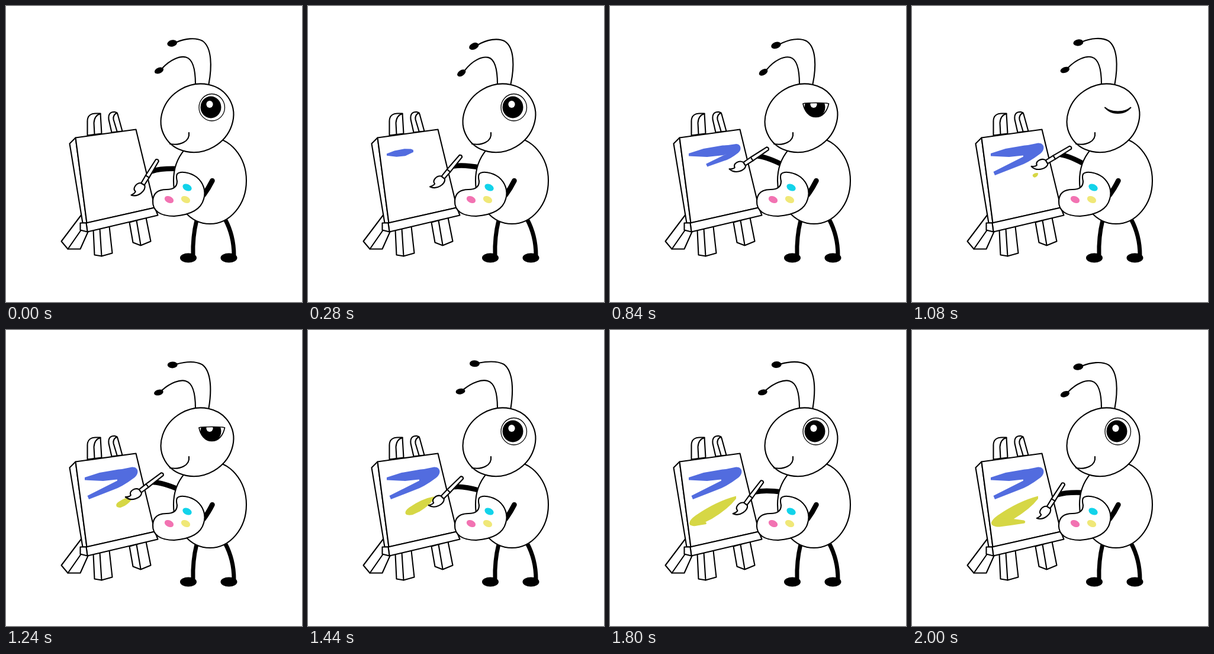
These frames come from a looping animation (500 by 500 pixels, 2040 ms). An HTML page:

```html
<!DOCTYPE html>
<html lang="en">
<head>
<meta charset="utf-8">
<title>Painting ant</title>
<style>
  html, body { margin: 0; width: 100%; height: 100%; overflow: hidden; background: #fff; }
  svg { display: block; width: 100%; height: 100%; }
  .line { fill: none; }
  .limb { fill: none; stroke-width: 8.5; }
  .leg { fill: none; stroke-width: 7; }
  .solid { fill: #000; stroke: none; }
  .blob { stroke: none; }
  .blue { fill: #526cdf; stroke: none; }
  .yellow { fill: #d6d745; stroke: none; }
</style>
</head>
<body>
<svg viewBox="0 0 500 500" fill="#fff" stroke="#000" stroke-width="2.1" stroke-linejoin="round" stroke-linecap="round">
  <defs><clipPath id="lidClip"><path id="lidShape"/></clipPath></defs>

  <g transform="translate(.5 .5)">
    <path d="M137 218V194C137 184 144 181 151 181H159L161 215Z"/>
    <path class="line" d="M149 216L148 197Q149 184 159 181.5"/>
    <path d="M178 213L173 191C172 182 176 178 183 178.5Q187 179 188 182L196 211Z"/>
    <path class="line" d="M187 211L181 191Q180 183 187 180"/>
    <path d="M127 352L93 397L104 410H125L138 381Z"/>
    <path class="line" d="M127 377L104 410"/>
    <path d="M147 378L149 420L161 422L179 417L174 372Z"/>
    <path class="line" d="M158 376L161 422"/>
    <path d="M208 365L214 399L227 404L244 397L236 357Z"/>
    <path class="line" d="M220 362L227 403"/>
    <path d="M107 232L117 222L136 366H129Z"/>
    <path d="M117 222L219 208L251 340L136 366Z"/>
    <path d="M135 366L251 340L256 353L137 381Z"/>
    <path d="M125 366H135L137 381L125 378Z"/>
  </g>

  <path id="blueBar" class="blue" d="M133 249L158 241L190 235.5L211 235L218 237V242L192 252L164 255L133 253.5Z"/>
  <path id="blueTail" class="blue" d="M186 237L213 231.5C224 231 226 243 216 250Q196 265 181 270L140 286L137.500 280L188 254.500Z"/>
  <path id="yellowLeaf" class="yellow" d="M213 280.5Q180 289 145 313Q131 323 135 329Q138 332 152 329L172 319Q200 302 213 285Z"/>
  <path id="yellowTail" class="yellow" d="M134 324Q134 333 148 332.500L170 329.500L190 326.500Q193 323 189 321.500L171 319L150 318Z"/>

  <path id="arm" class="limb" d="M247 279Q261 274 292 275"/>
  <path class="leg" d="M322 362Q315 390 316 421M370 360Q385 388 385 421"/>
  <ellipse class="solid" cx="308" cy="425.5" rx="14" ry="8"/>
  <ellipse class="solid" cx="376.5" cy="425.5" rx="14" ry="8"/>
  <ellipse cx="344.5" cy="295" rx="61.5" ry="73"/>
  <path class="limb" d="M334 319Q342 308 348.5 295"/>

  <path d="M289 284C294 278 311 281 322 289C334 299 338 313 334 326C329 345 310 353 284 355C262 355 247 347 248 329C249 312 262 310 271 310C284 310 289 305 289 296Q287 288 289 284Z"/>
  <ellipse class="blob" fill="#12d3ea" rx="8" ry="5.5" transform="translate(306 306.5) rotate(25)"/>
  <ellipse class="blob" fill="#f273b2" rx="8" ry="5.5" transform="translate(275.5 327) rotate(25)"/>
  <ellipse class="blob" fill="#f0e878" rx="8" ry="5.5" transform="translate(303.5 327) rotate(25)"/>

  <path id="feelers" class="line"/>
  <ellipse id="knobHigh" class="solid" rx="8.5" ry="5.5"/>
  <ellipse id="knobLow" class="solid" rx="8" ry="4.8"/>

  <ellipse rx="63" ry="56" transform="translate(323 189.3) rotate(-30)"/>
  <path class="line" d="M277 233C294 236 311 229 309 214"/>
  <g clip-path="url(#lidClip)">
    <ellipse class="solid" cx="346" cy="171" rx="17.5" ry="18.5"/>
    <ellipse class="blob" cx="344" cy="166" rx="5.6" ry="6"/>
  </g>
  <path id="lid" class="line"/>

  <g id="brush">
    <g transform="translate(231.5 300) rotate(-58.6)">
      <path d="M-1 -3.5C-5 -11 -17 -11 -18 -4Q-21 -3 -27 -7C-24 6 -7 10 -1 4Z"/>
      <path d="M-1 -3.2L14 -3.5L46 -2.8Q49 0 46 2.8L14 3.5L-1 3.2Z"/>
      <path class="line" d="M14 -3.5V3.5"/>
    </g>
  </g>
</svg>
<script>
const LOOP = 2040, STEP = 40;
const armKeys = [[0, 0], [840, 25], [1080, 27.4], [1440, 13.5], [LOOP, 0]];

const $ = id => document.getElementById(id);
const set = (id, name, value) => $(id).setAttribute(name, value);
const ramp = (t, from, to) => Math.min(1, Math.max(0, (t - from) / (to - from)));
const armAngle = t => armKeys.slice(1).reduce((angle, [time, next], i) =>
  angle + (next - armKeys[i][1]) * ramp(t, armKeys[i][0], time), 0);

// Stretches a paint stroke out of its starting point; width runs ahead of length.
function grow(id, x, y, angle, p) {
  set(id, 'transform', `translate(${x} ${y}) rotate(${angle}) ` +
    `scale(${p} ${Math.sqrt(p)}) rotate(${-angle}) translate(${-x} ${-y})`);
  set(id, 'visibility', p > 0 ? 'visible' : 'hidden');
}

function drawPaint(t) {
  grow('blueBar', 133, 251, -8, ramp(t, 0, 530));
  grow('blueTail', 216, 240, 150, ramp(t, 540, 980));
  grow('yellowLeaf', 213, 283, 149, ramp(t, 1000, 1720));
  grow('yellowTail', 138, 328, -5, ramp(t, 1660, 1960));
}

function drawFeelers(t) {
  const s = Math.sin(t / LOOP * 2 * Math.PI);
  set('feelers', 'd',
    `M342.5 132C${348 + s} 103 ${348 + s} 70 ${332 + s} ${59 + s}` +
    `C${320 + s} ${52.5 + s} 302 ${55 + 2 * s} ${287 - s} ${61.5 + 6 * s}` +
    `M320 132C320 110 317 90 ${304 + s / 2} ${86.5 + s / 2}` +
    `C294 ${84 + s} 278 ${90 + 2 * s} ${264 + s} ${105 + 5 * s}`);
  const place = (id, x, y, angle) => set(id, 'transform', `translate(${x} ${y}) rotate(${angle})`);
  place('knobHigh', 280.8 - s * 0.7, 63 + s * 6.5, -12 - s * 15);
  place('knobLow', 258.5 + s, 109 + s * 5.5, -23 - s * 14);
}

function drawEye(t) {
  const k = ramp(t, 600, 1080) - ramp(t, 1080, 1400);
  const side = 171.5 - 26 * k * (1 - k);
  const top = 148.5 + 30 * k, low = 194 - 13 * k;
  const left = 326 + 5 * k, right = 369.5 - 5 * k;
  const up = side + (top - side) * 0.55, down = side + (low - side) * 0.55;
  const d = `M326 ${side}C${left} ${up} 336 ${top} 347.7 ${top}S${right} ${up} 369.5 ${side}` +
    `C${right} ${down} 359.5 ${low} 347.7 ${low}S${left} ${down} 326 ${side}Z`;
  set('lidShape', 'd', d);
  set('lid', 'd', d);
  set('lid', 'stroke-width', 1.3 + k * 0.7);
}

function draw(t) {
  const turn = `rotate(${armAngle(t)} 306 275)`;
  set('arm', 'transform', turn);
  set('brush', 'transform', turn);
  drawPaint(t);
  drawFeelers(t);
  drawEye(t);
}

const start = performance.now();
function tick() {
  const t = (performance.now() - start) % LOOP;
  draw(Math.floor(t / STEP) * STEP);
  requestAnimationFrame(tick);
}
tick();
</script>
</body>
</html>
```
